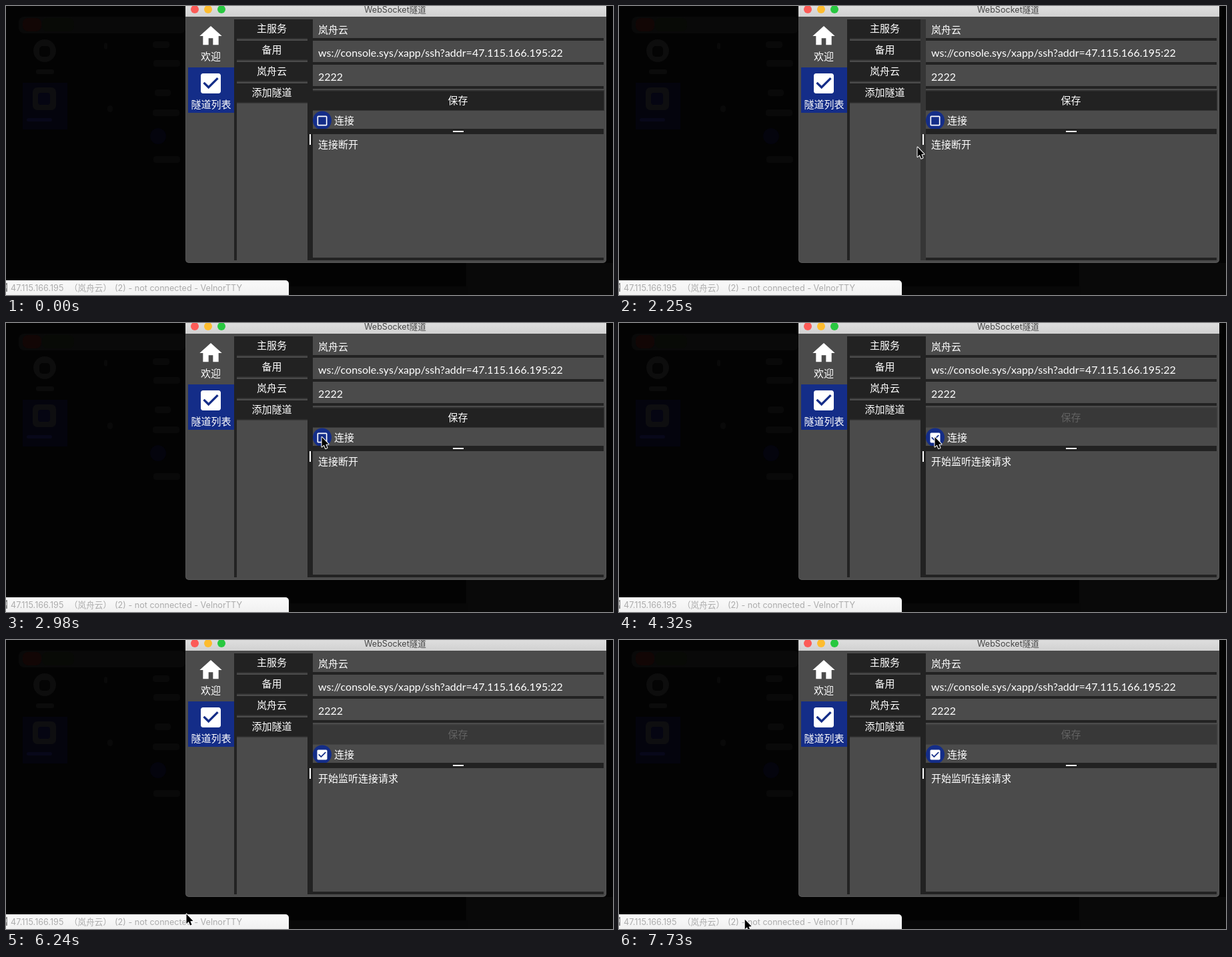
An HTML page with a canvas that plays this animation: 910x433 px, repeating every 8 s.

```html
<!DOCTYPE html>
<html lang="zh-CN">
<head>
<meta charset="utf-8">
<title>WebSocket隧道</title>
<style>
html, body { margin: 0; width: 100%; height: 100%; overflow: hidden; background: #030303; }
canvas { display: block; }
</style>
</head>
<body>
<canvas id="stage" width="910" height="433"></canvas>
<script>
const ctx = document.getElementById('stage').getContext('2d');
const LOOP = 8000;
const GREY = '#4b4b4b', DARK = '#222222', BLUE = '#142d88', WHITE = '#ffffff';
const CJK = '15px "Noto Sans CJK SC", "Noto Sans CJK", sans-serif';
const LATIN = '16px Lato, sans-serif';
const SYSTEM = 'Inter, "Noto Sans CJK SC", "Noto Sans CJK", sans-serif';

const ICONS = {
  home: new Path2D('M10 20v-6h4v6h5v-8h3L12 3 2 12h3v8z'),
  checked: new Path2D('M19 3H5c-1.1 0-2 .9-2 2v14c0 1.1.9 2 2 2h14c1.1 0 2-.9 2-2V5c0-1.1-.9-2-2-2zM10 17l-5-5 1.41-1.41L10 14.17l7.59-7.59L19 8z'),
  unchecked: new Path2D('M19 5v14H5V5h14m0-2H5c-1.1 0-2 .9-2 2v14c0 1.1.9 2 2 2h14c1.1 0 2-.9 2-2V5c0-1.1-.9-2-2-2z')
};
const ARROW = new Path2D('M0 0V14.5L3.3 11.6 5.6 17 8 16 5.8 10.7 10 10.4z');
const BEAM = new Path2D('M1.5 1.5Q4.5 1.5 4.5 4Q4.5 1.5 7.5 1.5M4.5 3.5V14.5M1.5 16.5Q4.5 16.5 4.5 14Q4.5 16.5 7.5 16.5');

// Pointer steps: start time, shape, x, y
const POINTER = [
  [0, null], [750, BEAM, 483, 226], [900, BEAM, 478, 222],
  [2250, ARROW, 447.5, 211.5], [2390, ARROW, 450, 199], [2540, ARROW, 464.5, 172.5],
  [2680, ARROW, 472.5, 168.5], [2830, ARROW, 473, 170], [2980, ARROW, 473.5, 171],
  [5800, ARROW, 412.5, 202.5], [5950, ARROW, 268.5, 374], [6100, ARROW, 262.5, 376.5],
  [6240, ARROW, 270.5, 410.5], [6390, ARROW, 257.5, 429.5], [6530, null],
  [7430, ARROW, 193.5, 426.5], [7580, ARROW, 190, 418.5], [7730, ARROW, 188.7, 418.7]
];
const SPLITTER = [[0, DARK], [2250, '#363636'], [2390, '#3a3a3a'], [2540, '#363636'], [2680, DARK]];

const at = (steps, t) => steps.filter(s => s[0] <= t).pop();

function rect(x, y, w, h, color, radius = 0) {
  ctx.fillStyle = color;
  ctx.beginPath();
  ctx.roundRect(x, y, w, h, radius);
  ctx.fill();
}

function disc(x, y, r, color) {
  rect(x - r, y - r, 2 * r, 2 * r, color, r);
}

function text(str, x, y, font = CJK, color = WHITE, align = 'left') {
  ctx.font = font;
  ctx.fillStyle = color;
  ctx.textAlign = align;
  ctx.fillText(str, x, y);
}

function icon(path, x, y, size) {
  ctx.save();
  ctx.translate(x, y);
  ctx.scale(size / 24, size / 24);
  ctx.fillStyle = WHITE;
  ctx.fill(path, 'evenodd');
  ctx.restore();
}

function vertical(y0, y1, from, to) {
  const g = ctx.createLinearGradient(0, y0, 0, y1);
  g.addColorStop(0, from);
  g.addColorStop(1, to);
  return g;
}

function drawBackdrop() {
  rect(0, 0, 910, 433, '#030303');
  rect(690, 385, 220, 48, '#090909');
  rect(424, 420, 268, 13, '#080808');
  rect(19, 16, 251, 25, '#090909', 8);
  rect(25, 18, 28, 20, '#120605', 8);
  rect(54, 18, 48, 20, '#080a06', 8);
  rect(25, 115, 67, 70, '#04040d');
  disc(58, 67, 17, '#0d0d0d');
  rect(50, 60, 16, 16, '#040404', 5);
  rect(45, 95, 27, 7, '#0b0b0b', 3);
  rect(40, 122, 35, 34, '#0e0e10', 7);
  rect(48, 130, 18, 18, '#050512', 4);
  rect(31, 168, 38, 5, '#08081a', 3);
  for (const [x, y, w] of [[220, 53, 25], [221, 81, 40], [223, 125, 24], [220, 155, 40], [221, 225, 40], [152, 149, 8], [147, 55, 5]])
    rect(x, y, w, 10, '#090909', 4);
  disc(228, 195, 12, '#04040d');
}

function drawTerminalTitle() {
  rect(-8, 411, 432, 30, vertical(411, 433, '#fafafa', '#f1f1f1'), 5);
  rect(0, 415, 2, 13, '#8c8c8c');
  rect(0, 418, 1, 5, '#dddddd');
  const font = '12.6px ' + SYSTEM, color = '#acacac';
  text('47.115.166.195', 7, 427, font, color);
  text('（岚舟云）', 95, 427, font, color);
  text('(2) - not connected - VelnorTTY', 163, 427, font, color);
}

function drawNavigation() {
  icon(ICONS.home, 287, 25, 40);
  text('欢迎', 307, 81, CJK, WHITE, 'center');
  rect(273, 92, 69, 68, BLUE);
  icon(ICONS.checked, 287, 96, 40);
  text('隧道列表', 307.5, 153, CJK, WHITE, 'center');
}

function drawTunnels() {
  rect(342, 20, 4, 361, DARK);
  ['主服务', '备用', '岚舟云', '添加隧道'].forEach((label, i) => {
    const y = 20 + 32 * i;
    rect(346, y, 106, 30, '#383838');
    rect(346, y, 106, 28.5, DARK);
    text(label, 398.5, y + 19.3, CJK, WHITE, 'center');
  });
}

function drawForm(connected) {
  for (const y of [48, 84, 120, 377]) rect(460, y, 436, 4, DARK);
  text('岚舟云', 468, 41);
  text('ws://console.sys/xapp/ssh?addr=47.115.166.195:22', 468, 76, LATIN);
  text('2222', 468, 112, LATIN);

  rect(460, 126, 437, 31, connected ? '#404040' : '#343434');
  rect(460, 127.5, 436, 28.5, connected ? '#383838' : DARK);
  text('保存', 677.5, 147, CJK, connected ? '#626262' : WHITE, 'center');

  disc(474, 171.5, 14, BLUE);
  icon(connected ? ICONS.checked : ICONS.unchecked, 464, 162, 20);
  text('连接', 492, 177);

  rect(460, 184, 436, 8, DARK);
  rect(670, 187, 16, 2, WHITE);
  text(connected ? '开始监听连接请求' : '连接断开', 468, 213);
}

function drawWindow(t) {
  rect(269, -10, 631, 395, '#5c5c5c', 5);
  rect(269.7, -10, 629.6, 394.3, GREY, 5);
  rect(269, 0, 631, 16, vertical(0, 16, '#dedede', '#d1d1d1'));
  ['#fc5b57', '#fdbc2e', '#28c840'].forEach((color, i) => disc(283 + 20 * i, 5, 6, color));
  text('WebSocket隧道', 583.5, 10, '12.6px ' + SYSTEM, '#454545', 'center');
  drawNavigation();
  drawTunnels();
  rect(452, 20, 8, 361, at(SPLITTER, t)[1]);
  rect(455, 192, 2, 16, WHITE);
  drawForm(t >= 4320);
}

function drawPointer(t) {
  const [, shape, x, y] = at(POINTER, t);
  if (!shape) return;
  ctx.save();
  ctx.translate(x, y);
  ctx.lineJoin = 'round';
  ctx.strokeStyle = WHITE;
  ctx.lineWidth = shape === BEAM ? 2.6 : 2;
  ctx.stroke(shape);
  if (shape === BEAM) {
    ctx.strokeStyle = '#000';
    ctx.lineWidth = 1;
    ctx.stroke(shape);
  } else {
    ctx.fillStyle = '#000';
    ctx.fill(shape);
  }
  ctx.restore();
}

function render() {
  const t = performance.now() % LOOP;
  drawBackdrop();
  drawTerminalTitle();
  drawWindow(t);
  drawPointer(t);
  requestAnimationFrame(render);
}
render();
</script>
</body>
</html>
```
